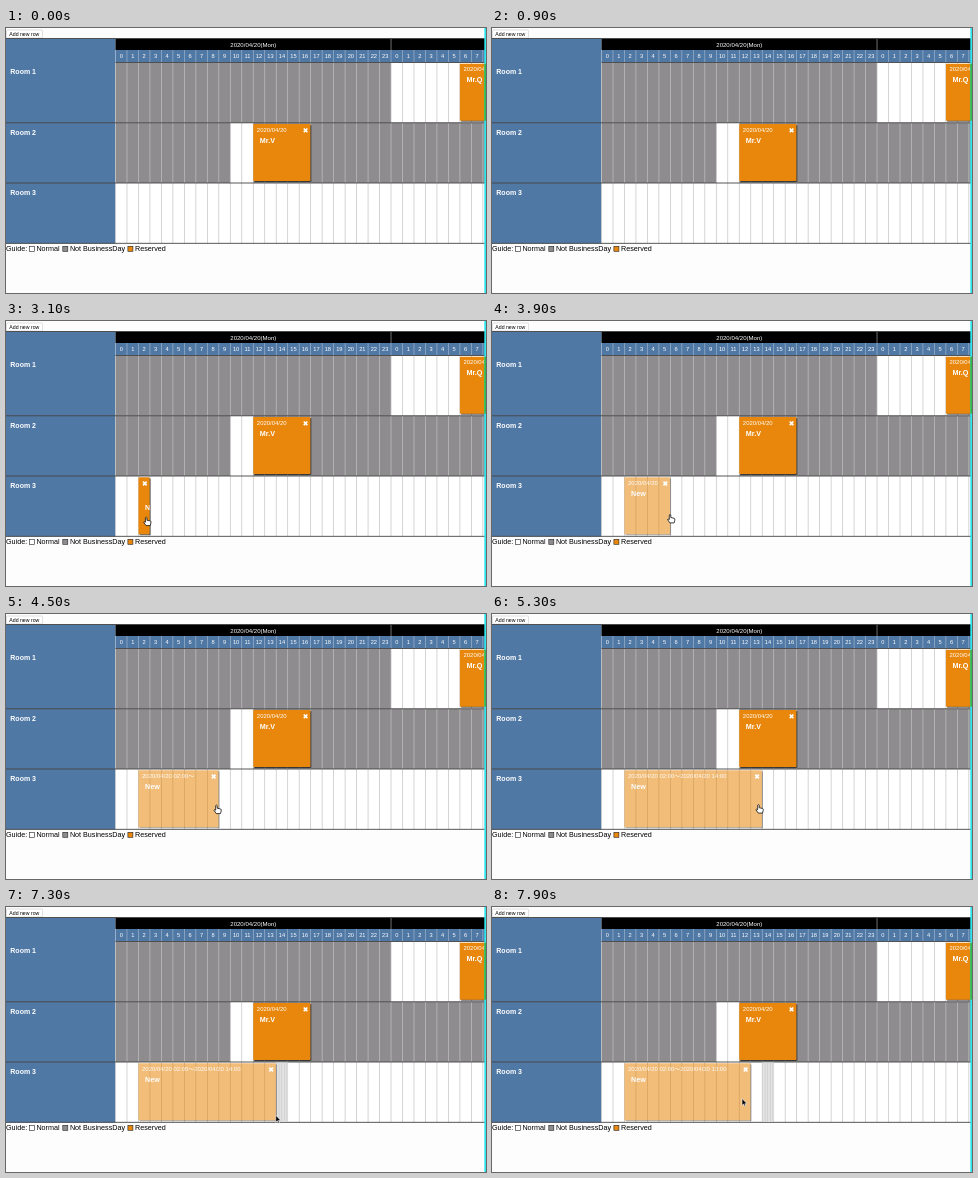
An HTML page for the animation above (8000 ms loop, 480x265 px).

```html
<!DOCTYPE html>
<html lang="en">
<head>
<meta charset="utf-8">
<title>Room schedule</title>
<style>
html, body { margin: 0; width: 100%; height: 100%; overflow: hidden; background: #fdfdfd; }
svg { display: block; width: 480px; height: 265px; font-family: "Liberation Sans", "Noto Sans CJK JP", sans-serif; }
text { white-space: pre; }
.card { filter: drop-shadow(1px 1px .6px rgba(0, 0, 0, .6)); }
</style>
</head>
<body>
<svg id="stage" viewBox="0 0 480 265"></svg>
<script>
const stage = document.getElementById('stage');
const LEFT = 109.5, HOUR = 11.48, LOOP = 8000, STEP = 100;
const BLUE = '#5078a5', GREY = '#8e8c8e', ORANGE = '#e8870c';
const ROWS = [34.5, 94.8, 155, 215.3];
const hourX = h => LEFT + h * HOUR;

function add(tag, attrs, parent = stage) {
  const node = document.createElementNS('http://www.w3.org/2000/svg', tag);
  for (const key in attrs) node.setAttribute(key, attrs[key]);
  parent.append(node);
  return node;
}
const rect = (x, y, width, height, fill, more, parent) =>
  add('rect', { x, y, width, height, fill, ...more }, parent);
function label(x, y, size, value, more, parent) {
  const node = add('text', { x, y, 'font-size': size, ...more }, parent);
  node.textContent = value;
  return node;
}
const white = { fill: '#fff' };
const bold = { fill: '#fff', 'font-weight': 'bold' };
const centred = { fill: '#fff', 'text-anchor': 'middle' };

function drawPage() {
  rect(.5, 2, 36, 8, '#fff', { stroke: '#ccc', 'stroke-width': .6, rx: 1 });
  label(3.3, 8.4, 5.2, 'Add new row');

  rect(0, 10.5, LEFT, 205, BLUE);
  rect(LEFT, 10.5, 371, 11.5, '#000');
  rect(LEFT, 22, 371, 12.5, BLUE);
  label(247.3, 18.6, 6.05, '2020/04/20(Mon)', centred);
  rect(hourX(24) - .4, 10.5, .8, 11.5, '#888');

  rect(LEFT, ROWS[0], 371, ROWS[3] - ROWS[0], '#fff');
  rect(LEFT, ROWS[0], 24 * HOUR, 60.3, GREY);
  rect(LEFT, ROWS[1], 10 * HOUR, 60.2, GREY);
  rect(hourX(12), ROWS[1], 480 - hourX(12), 60.2, GREY);

  for (let i = 0; i < 33; i++) {
    rect(hourX(i) - .3, 22, .6, 12.5, '#a9bcd2');
    rect(hourX(i) - .35, ROWS[0], .7, ROWS[3] - ROWS[0], '#c0c2c0');
    label(hourX(i + .5), 30, 5.7, i % 24, centred);
  }
  for (const y of [10.5, ...ROWS]) {
    const x = y === ROWS[0] ? LEFT : 0;
    rect(x, y - .45, 480 - x, .9, '#444');
  }
  for (let i = 0; i < 3; i++) label(4.3, ROWS[i] + 11.9, 7, 'Room ' + (i + 1), bold);

  label(0, 223.4, 7.2, 'Guide:');
  [[23.3, '#fff', 'Normal'], [56.8, GREY, 'Not BusinessDay'], [121.9, ORANGE, 'Reserved']]
    .forEach(([x, fill, name]) => {
      rect(x, 218.3, 5, 5, fill, { stroke: '#222', 'stroke-width': .6 });
      label(x + 7.1, 223.4, 7.2, name);
    });
}

// A booking whose date wraps, and slides below the close mark when too narrow.
function makeCard(row, name) {
  const top = ROWS[row] + 1.2;
  const group = add('g', {});
  const clip = add('clipPath', { id: 'clip' + row }, group);
  const mask = rect(0, top, 0, 57, '#000', {}, clip);
  const body = rect(0, top, 0, 57, ORANGE, { class: 'card', rx: .8 }, group);
  const words = add('g', { 'clip-path': `url(#clip${row})` }, group);
  const date = label(0, 0, 5.95, '', white, words);
  const title = label(0, 0, 7.2, name, bold, words);
  const close = add('path', { d: 'M-1.8-1.8 1.8 1.8M1.8-1.8-1.8 1.8', stroke: '#fff', 'stroke-width': 1.7 }, group);
  const place = (node, x, y) => { node.setAttribute('x', x); node.setAttribute('y', y); };

  function set(start, end, from, to) {
    const x = hourX(start), width = (end - start) * HOUR - .3, room = width - 14;
    for (const box of [mask, body]) {
      box.setAttribute('x', x);
      box.setAttribute('width', width);
    }
    const drop = room < 30 ? 14 : 0;
    const parts = [[0, from.slice(0, 10)], [53, from.slice(10) + '～'], [83, to.slice(0, 10)], [98, to.slice(10)]];
    date.textContent = parts.filter(part => room >= part[0]).map(part => part[1]).join('');
    place(date, x + 3.6, top + 7.7 + drop);
    place(title, x + 6.5, top + 18.5 + drop);
    close.setAttribute('transform', `translate(${x + width - 4.8} ${top + 6.3})`);
  }
  return { group, set };
}

drawPage();
makeCard(0, 'Mr.Q').set(30, 36, '2020/04/21 06:00', '2020/04/21 12:00');
makeCard(1, 'Mr.V').set(12, 17, '2020/04/20 12:00', '2020/04/20 17:00');

const ghost = add('g', {});
rect(hourX(14), ROWS[2] + .5, HOUR, 59.4, '#e2e2e2', {}, ghost);
for (let i = 0; i < 5; i++) rect(hourX(14) + i * 2.6, ROWS[2] + .5, .5, 59.4, '#c4c4c4', {}, ghost);

const fresh = makeCard(2, 'New');
rect(478.3, 0, 1.7, 265, '#2ee6ee');
rect(478.3, ROWS[0] + 1.2, 1.7, 57, '#35b84a');

const arrow = add('path', {
  d: 'M0 0V7L1.6 5.6 2.7 8 3.8 7.5 2.8 5.2H5Z',
  fill: '#000', stroke: '#fff', 'stroke-width': .6
});
const hand = add('path', {
  d: 'M-.8.6Q0-.5.7.6V3.2L4.2 4Q5 4.4 4.7 6L4 8.6H-.2L-2.6 5.2Q-2.4 4.2-.8 5.2Z',
  fill: '#fff', stroke: '#111', 'stroke-width': .8
});

// time, pointer x, pointer y
const PATH = [
  [1100, 253, 256], [1400, 252.5, 255.5], [1700, 196, 219], [2100, 139.5, 196],
  [3200, 140.3, 196], [4500, 210.5, 191], [5300, 266.5, 190.5], [5800, 274.5, 190.5],
  [6300, 274.5, 190.5], [6900, 273, 211], [7200, 273, 211], [7900, 250, 191.5]
];
function pointerAt(t) {
  const i = PATH.findIndex(p => p[0] >= t);
  if (i < 1) return PATH[0];
  const a = PATH[i - 1], b = PATH[i], k = (t - a[0]) / (b[0] - a[0]);
  return a.map((v, n) => v + (b[n] - v) * k);
}
const show = (node, on) => node.setAttribute('visibility', on ? 'visible' : 'hidden');

function draw(t) {
  const [, x, y] = pointerAt(t);
  const usesHand = t >= 3100 && t < 6400;
  show(arrow, t >= 1100 && !usesHand);
  show(hand, usesHand);
  for (const node of [arrow, hand]) node.setAttribute('transform', `translate(${x} ${y})`);

  const booked = t >= 3100;
  fresh.group.style.display = booked ? '' : 'none';
  show(ghost, t >= 6400);
  if (!booked) return;
  const end = Math.max(3, Math.ceil((x - LEFT) / HOUR));
  const dragging = (t >= 3300 && t < 6000) || t >= 6400;
  fresh.group.setAttribute('opacity', dragging ? .55 : 1);
  fresh.set(2, end, '2020/04/20 02:00', `2020/04/20 ${String(end).padStart(2, '0')}:00`);
}

const begin = performance.now();
function tick() {
  const t = (performance.now() - begin) % LOOP;
  draw(Math.floor(t / STEP) * STEP);
  requestAnimationFrame(tick);
}
tick();
</script>
</body>
</html>
```
